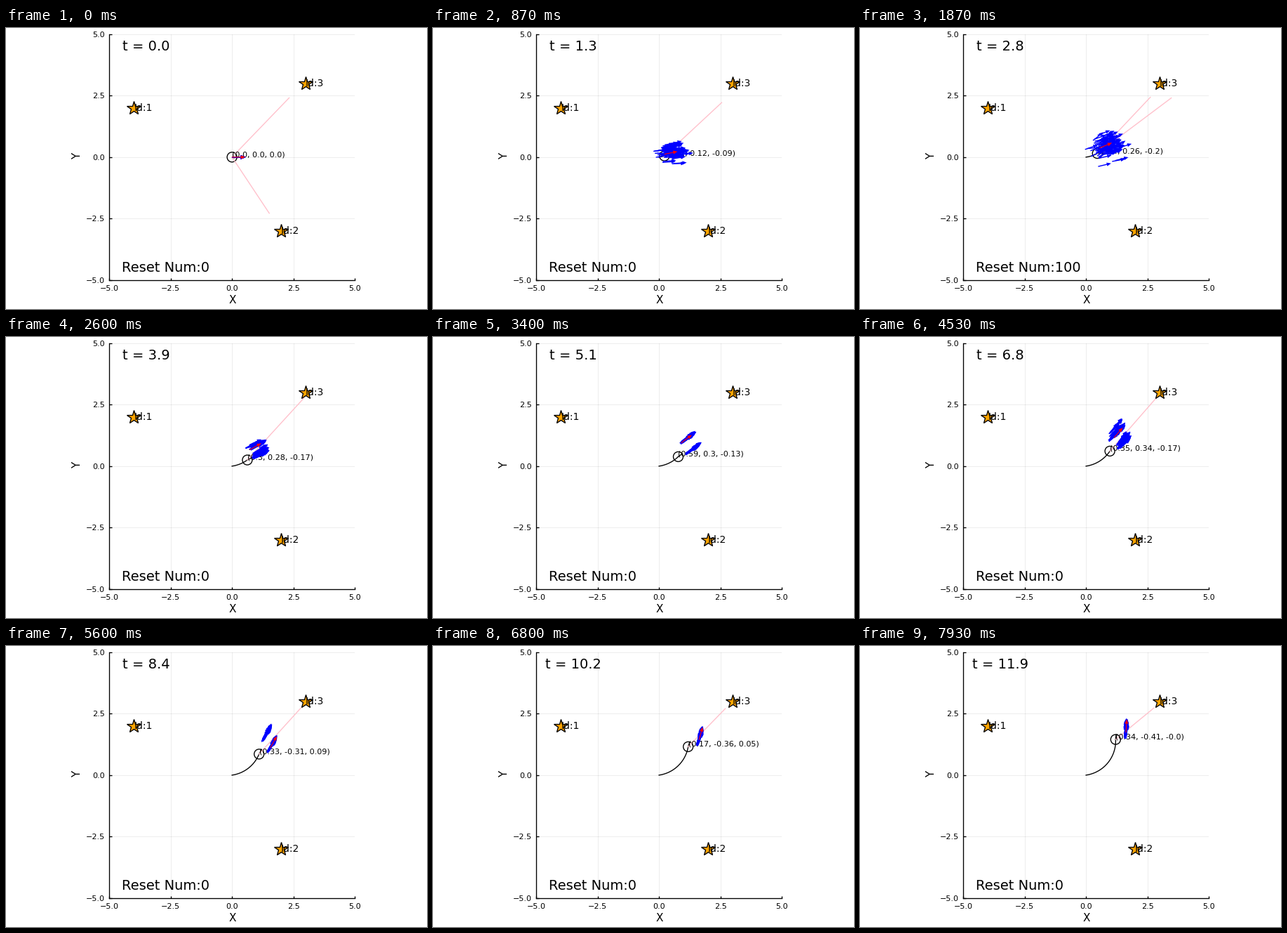
Animation, 600 px wide and 400 px high, one loop 8 s. Source, as a matplotlib script:

```python
import numpy as np
import matplotlib.pyplot as plt
from matplotlib.animation import FuncAnimation

plt.rcParams["font.family"] = "DejaVu Sans"

W, H, DPI = 600, 400, 100
LOOP = 8000
STEPS = 120             # simulation steps per loop
DT = 0.1
COUNT = 100             # particles
PX = 1 / 34.96          # one pixel in plot units
PT = 72 / DPI           # one pixel in points
LINE = 1.35 * PT

LANDMARKS = [(-4, 2), (2, -3), (3, 3)]
RESET_TIMES = (0.9, 2.8, 5.8)

# The robot drives a circular arc
SPEED = 0.174
TURN = np.radians(7.1)
START = np.radians(8)
VIEW = np.radians(62)   # half the field of view

# Where the two rival estimates settle, as pixel offsets from the robot
RIVALS = np.array([(14, 6), (6, 22)])

# Key values of the printed triple
READ_T = (0, 2.8, 5.1, 6.8, 8.4, 10.2, 11.9)
READ_V = ((0, 0.04, 0.59, 0.35, 0.33, 0.17, 0.34),
          (0, 0.26, 0.3, 0.34, -0.31, -0.36, -0.41),
          (0, -0.2, -0.13, -0.17, 0.09, 0.05, -0.003))

rng = np.random.default_rng(12)
scatter = rng.standard_t(4, size=(COUNT, 3)).clip(-2.8, 2.8)
scatter[:2] *= 0.3      # the surviving pair starts near the middle
fine = rng.normal(size=(COUNT, 3)).clip(-2, 2)

times = np.arange(STEPS) * DT
course = START + TURN * times
radius = SPEED / TURN
path_x = radius * (np.sin(course) - np.sin(START))
path_y = radius * (np.cos(START) - np.cos(course))


def particles(n):
    """Cloud after resampling: fewer and tighter clumps with age."""
    t = times[n]
    past = [r for r in RESET_TIMES if r <= t + 1e-9]
    age = t - past[-1] if past else 0
    spread = 6.5 * np.exp(-age / 1.3) if past else t
    clumps = max(2 if age < 3.5 else 1, int(COUNT * np.exp(-2.3 * age)))
    parent = np.arange(COUNT) % clumps

    heading = TURN * t
    ready = min(1, t)
    local = np.random.default_rng(500 + n).normal(size=(COUNT, 3))
    local = ready * (fine + 0.15 * local)
    along = spread * scatter[parent, 0] + 2.4 * local[:, 0]
    across = spread * scatter[parent, 1] + 0.7 * local[:, 1]
    centre = RIVALS[parent % 2] * min(1, t / 5)
    c, s = np.cos(heading), np.sin(heading)
    x = path_x[n] + (centre[:, 0] + along * c - across * s) * PX
    y = path_y[n] + (centre[:, 1] + along * s + across * c) * PX
    turn = spread * scatter[parent, 2] + 1.5 * local[:, 2]
    best = 1 if age < 2.5 else 0
    return x, y, heading + np.radians(turn), best


def is_reset(n):
    return any(abs(times[n] - r) < DT / 2 for r in RESET_TIMES)


def sightings(n):
    """Noisy range readings; a stray one sets off a reset."""
    r = np.random.default_rng(900 + n)
    x, y = path_x[n], path_y[n]
    ends = []
    for lx, ly in LANDMARKS:
        bearing = np.arctan2(ly - y, lx - x)
        if abs(bearing - TURN * times[n]) > VIEW:
            continue
        reach = np.hypot(lx - x, ly - y)
        errors = [0.03 * r.normal()]
        if is_reset(n):
            errors.append(-0.2)
        for err in errors:
            d = reach * r.uniform(0.75, 1)
            if n == 0 or r.random() < 0.88:
                ends.append((x + d * np.cos(bearing + err),
                             y + d * np.sin(bearing + err)))
    return ends


fig = plt.figure(figsize=(W / DPI, H / DPI), dpi=DPI, facecolor="white")
ax = fig.add_axes([147.3 / W, 41.4 / H, 349.6 / W, 349.6 / H])
ax.set(xlim=(-5, 5), ylim=(-5, 5))
ticks = np.linspace(-5, 5, 5)
ax.set_xticks(ticks)
ax.set_yticks(ticks)
ax.xaxis.set_major_formatter("{x:.1f}")
ax.yaxis.set_major_formatter("{x:.1f}")
ax.tick_params(direction="in", length=3.5 * PT, width=LINE, labelsize=8, pad=4.5)
ax.tick_params(axis="x", pad=5.2)
ax.set_axisbelow(True)
ax.grid(color="black", alpha=0.1, linewidth=0.7 * PT)
for side in ("top", "right"):
    ax.spines[side].set_visible(False)
for side in ("left", "bottom"):
    ax.spines[side].set_linewidth(LINE)
fig.text(322.3 / W, 1 - 392.5 / H, "X", size=11, ha="center", va="baseline")
fig.text(101.5 / W, 1 - 182.5 / H, "Y", size=11, ha="center", va="center", rotation=90)


def label(x, y, text, size, ha="left"):
    """Text centred on y by its digits."""
    drop = 0.28 * size / PT * PX
    return ax.text(x, y - drop, text, size=size, ha=ha, va="baseline", zorder=4)


for i, (lx, ly) in enumerate(LANDMARKS, 1):
    ax.plot(lx, ly, "*", ms=21 * PT, mfc="orange", mec="black", mew=LINE, zorder=3)
    label(lx, ly, f"Id:{i}", 10)

clock = label(-3.5, 4.5, "", 14, "center")
resets = label(-4.5, -4.5, "", 14)
readout = ax.text(0, 0, "", size=8, ha="left", va="baseline", zorder=4)

trail, = ax.plot([], [], color="black", lw=LINE, zorder=2.5)
nose, = ax.plot([], [], color="black", lw=LINE, zorder=2.5)
body = plt.Circle((0, 0), 0.2, fill=False, ec="black", lw=LINE, zorder=2.5)
ax.add_patch(body)
rays = [ax.plot([], [], color="pink", lw=LINE, zorder=2.6)[0] for _ in range(2)]


def arrows(count, color, width, zorder):
    zero = np.zeros(count)
    head = 5.2 / width
    return ax.quiver(zero, zero, zero + 1, zero, color=color, units="dots",
                     width=width, headwidth=head, headlength=head * 1.2,
                     headaxislength=head * 1.2, scale=1, scale_units="xy",
                     zorder=zorder)


swarm = arrows(COUNT, "blue", 1.4, 5)
favourite = arrows(1, "red", 1.1, 6)
REACH = 19 * PX


def place(quiver, x, y, angle):
    quiver.set_offsets(np.column_stack([x, y]))
    quiver.set_UVC(REACH * np.cos(angle), REACH * np.sin(angle))


def draw(tick):
    # Two ticks per step, rounded to the nearer step
    n = min((tick + 1) // 2, STEPS - 1)
    x, y = path_x[n], path_y[n]
    clock.set_text(f"t = {times[n]:.1f}")
    resets.set_text(f"Reset Num:{COUNT if is_reset(n) else 0}")
    values = [str(round(float(np.interp(times[n], READ_T, v)), 2)) for v in READ_V]
    readout.set_text("(" + ", ".join(values) + ")")
    readout.set_position((x, y + 0.5 * PX))

    trail.set_data(path_x[:n + 1], path_y[:n + 1])
    body.center = (x, y)
    nose.set_data([x, x + 0.2 * np.cos(TURN * times[n])],
                  [y, y + 0.2 * np.sin(TURN * times[n])])
    ends = sightings(n)
    for i, ray in enumerate(rays):
        end = ends[i] if i < len(ends) else (x, y)
        ray.set_data([x, end[0]], [y, end[1]])

    px, py, angle, best = particles(n)
    place(swarm, px, py, angle)
    place(favourite, px[[best]], py[[best]], angle[[best]])
    return []


anim = FuncAnimation(fig, draw, frames=2 * STEPS, interval=LOOP / (2 * STEPS),
                     init_func=lambda: draw(0), repeat=True, repeat_delay=0)
plt.show()
```
